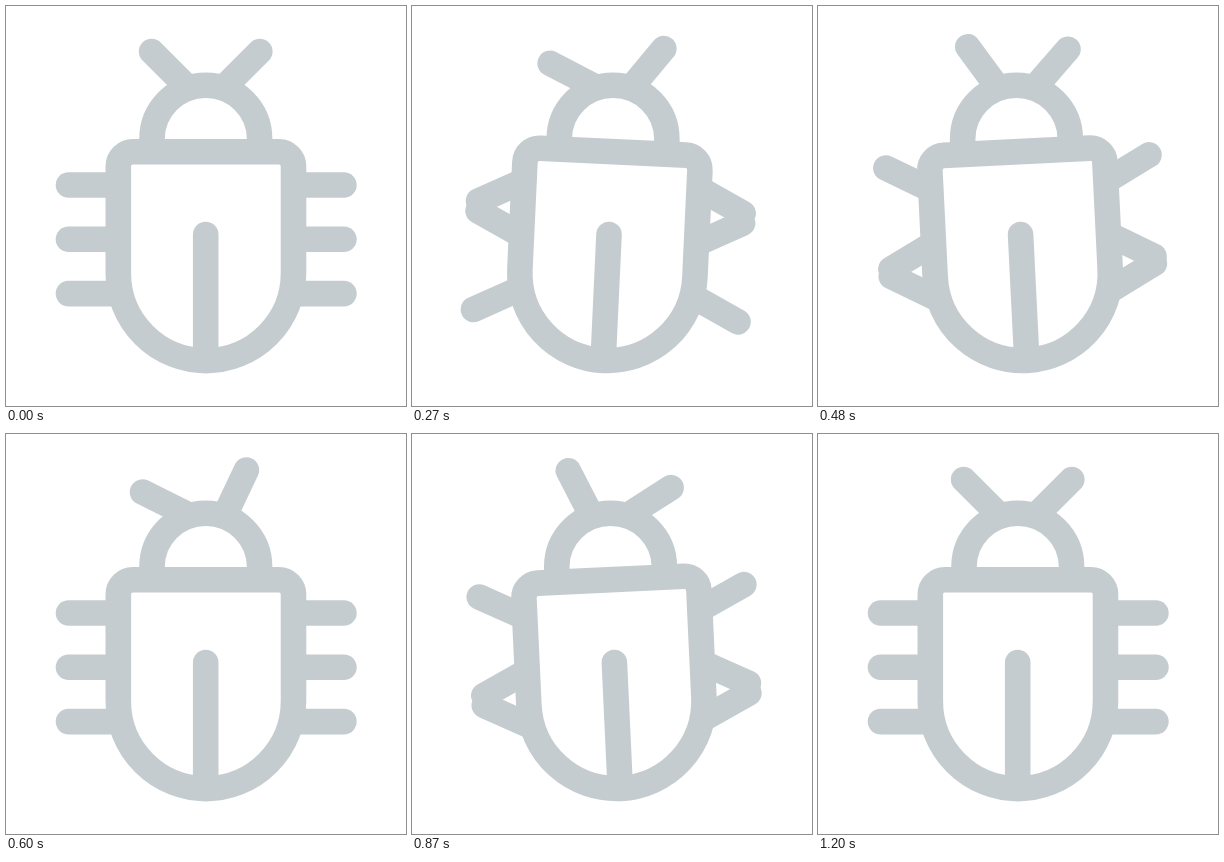
Write an HTML page that moves like this. It is 400 px wide and 400 px high and loops after 3.23 s.

```html
<!DOCTYPE html>
<html lang="en">
<head>
<meta charset="utf-8">
<title>Wiggling bug</title>
<style>
  html, body { margin: 0; width: 100%; height: 100%; overflow: hidden; background: #fff; }
  svg { display: block; width: 100vw; height: 100vh; }
  .bug { fill: none; stroke: #c5cccf; stroke-width: 25.6; }
  .round { stroke-linecap: round; }
</style>
</head>
<body>
<svg viewBox="0 0 400 400">
  <g class="bug">
    <g id="head">
      <path d="M146 145V133a53.8 53.8 0 0 1 107.6 0V145"/>
      <path id="antL" class="round" d="M179.6 79.5l-34 -34"/>
      <path id="antR" class="round" d="M219.8 79.5l34 -34"/>
    </g>
    <g id="body">
      <path d="M126.8 145.7H273a14.5 14.5 0 0 1 14.5 14.5V267a87.6 87.6 0 0 1 -175.2 0V160.2a14.5 14.5 0 0 1 14.5 -14.5z"/>
      <path class="round" d="M199.7 228.5V350"/>
      <g id="legs" class="round"></g>
    </g>
  </g>
</svg>
<script>
const LOOP = 3230, ACTIVE = 1200, STEP = 30;
const CENTER = 200.2, LEG_BASE = 88.4, LEG_LENGTH = 49.3;
const $ = id => document.getElementById(id);

const smooth = p => {
  p = Math.min(Math.max(p, 0), 1);
  return p * p * (3 - 2 * p);
};
const rotate = (el, angle, x, y) => el.setAttribute('transform', `rotate(${angle} ${x} ${y})`);

// Three full swings of the body and legs.
const sway = t => -Math.sin(6 * Math.PI * t / ACTIVE);

// Antennae run a little ahead around the middle, fade in at once and settle at the end.
function antenna(t, firstTurn, halfPeriod) {
  const ahead = 37 * Math.exp(-(((t - 460) / 170) ** 2));
  const fade = smooth(t / 60) * smooth((ACTIVE - t) / 320);
  return 20 * fade * Math.cos(Math.PI * (t + ahead - firstTurn) / halfPeriod);
}

const legs = [];
for (let row = 0; row < 3; row++) {
  for (const side of [-1, 1]) {
    const x = CENTER + side * LEG_BASE, y = 179 + 54.3 * row;
    const el = document.createElementNS('http://www.w3.org/2000/svg', 'path');
    el.setAttribute('d', `M${x} ${y}h${side * LEG_LENGTH}`);
    $('legs').append(el);
    legs.push({ el, x, y, swing: 30 * side * (row % 2 ? -1 : 1) });
  }
}

function draw(t) {
  const s = sway(t);
  rotate($('body'), 3 * s, 199.9, 171);
  $('head').setAttribute('transform', `translate(${1.4 * s} 0)`);
  rotate($('antL'), antenna(t, 52, 197), 179.6, 79.5);
  rotate($('antR'), -antenna(t, 195, 205.5), 219.8, 79.5);
  for (const { el, x, y, swing } of legs) rotate(el, swing * s, x, y);
}

const start = performance.now();
function tick() {
  const t = (performance.now() - start) % LOOP;
  draw(Math.min(Math.floor(t / STEP) * STEP, ACTIVE));
  requestAnimationFrame(tick);
}
tick();
</script>
</body>
</html>
```
